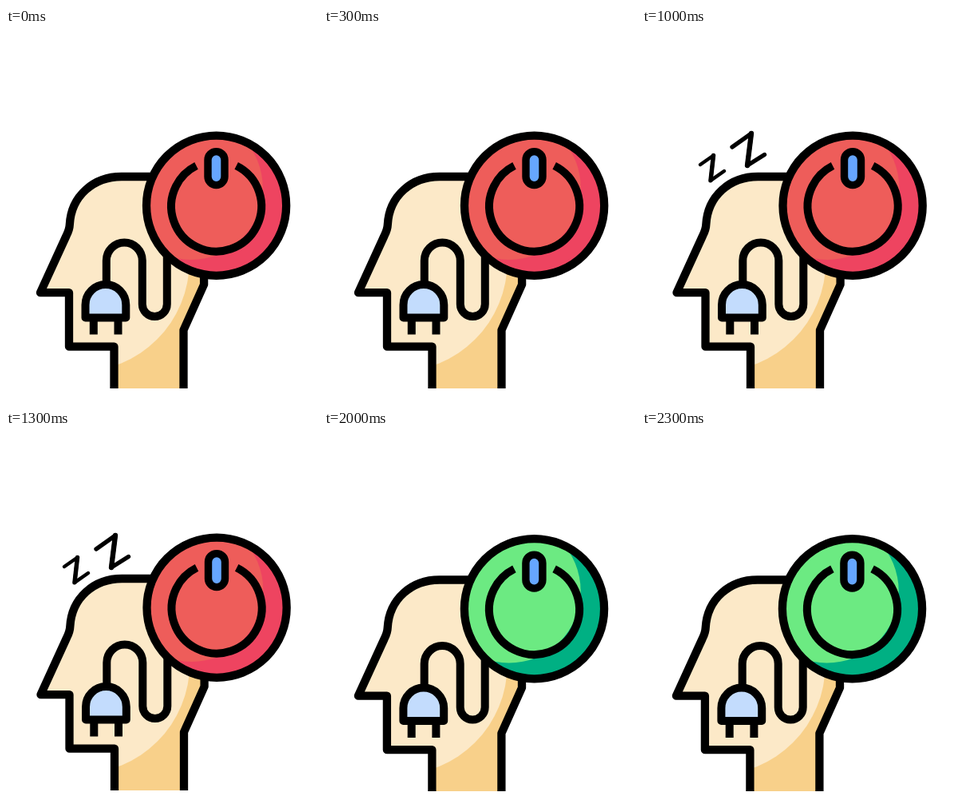
Animation, 391 px wide and 468 px high, one loop 2500 ms. Source, as an HTML page with a canvas:

```html
<!DOCTYPE html>
<html lang="en">
<head>
<meta charset="utf-8">
<title>Power nap</title>
<style>
  html, body { margin: 0; width: 100%; height: 100%; overflow: hidden; background: #fff; }
  canvas { display: block; }
</style>
</head>
<body>
<canvas id="stage" width="391" height="468"></canvas>
<script>
const ctx = document.getElementById('stage').getContext('2d');
const STEP = 500;

const RED = { base: '#ee5d5a', shade: '#ee4460' };
const GREEN = { base: '#6cea82', shade: '#00b083' };

// Each pose: small drift of the drawing, number of Zs, button colours.
const poses = [
  { dx: -0.2, dy: 0, zs: 0, button: RED },
  { dx: 0.3, dy: 0, zs: 1, button: RED },
  { dx: 0.3, dy: 0, zs: 2, button: RED },
  { dx: -0.3, dy: 0.7, zs: 3, button: RED },
  { dx: -0.3, dy: 1.5, zs: 0, button: GREEN }
];

const head = new Path2D(
  'M135.7 460 V398.7 H79.2 V331.2 H43.2 L75.8 260 Q79.8 252 80 246 ' +
  'C82 210 110 186 145 186 H200 L248.3 300 V321 L222.7 378 V460');
const cord = new Path2D(
  'M126 322 V291 A22.5 22.5 0 0 1 171 291 V345.5 A15.5 15.5 0 0 0 202 345.5 V285');
const plug = new Path2D('M99.7 362.5 V346.5 A25.4 25.4 0 0 1 150.5 346.5 V362.5 Z');
const prongs = new Path2D('M110 362 V383.5 M140.7 362 V383.5');

// Zs as corner points, with a slightly heavier diagonal.
const zShapes = [
  { points: [[73, 171], [89.5, 159.5], [86, 190.8], [103, 179]], width: 4.5 },
  { points: [[113, 149], [137, 132], [132, 172], [153.5, 158.5]], width: 5.3 },
  { points: [[154, 118.5], [185, 99.5], [178, 149.5], [206.5, 133]], width: 6.2 }
];

function circle(x, y, r) {
  const path = new Path2D();
  path.arc(x, y, r, 0, Math.PI * 2);
  return path;
}

function polyline(points) {
  return new Path2D('M' + points.join(' L'));
}

function fill(path, color) {
  ctx.fillStyle = color;
  ctx.fill(path);
}

function outline(path, width = 10) {
  ctx.lineWidth = width;
  ctx.stroke(path);
}

// Fills a shape with its shade, then covers the lit part with the base colour.
function shaded(path, shade, base, light) {
  ctx.save();
  ctx.clip(path);
  fill(path, shade);
  fill(light, base);
  ctx.restore();
}

function drawHead() {
  shaded(head, '#f8d08a', '#fce9c8', circle(92, 292, 138));
  outline(head, 10.3);
  outline(cord);
  fill(plug, '#c3dcfd');
  outline(plug);
  outline(prongs);
}

function drawButton({ base, shade }) {
  const disc = circle(263.8, 222.2, 87.6);
  shaded(disc, shade, base, circle(232, 200, 90));
  outline(disc, 10.3);

  const ring = new Path2D();
  const gap = 0.46;
  ring.arc(263.8, 223, 56.5, -Math.PI / 2 + gap, Math.PI * 1.5 - gap);
  outline(ring);

  const bar = new Path2D();
  bar.roundRect(253.2, 154.6, 21, 42, 10.5);
  fill(bar, '#66a6ff');
  outline(bar, 9.4);
}

function drawZ({ points, width }) {
  outline(polyline(points), width);
  outline(polyline(points.slice(1, 3)), width + 1);
}

function draw(now) {
  const pose = poses[Math.floor(now / STEP) % poses.length];
  ctx.fillStyle = '#fff';
  ctx.fillRect(0, 0, 391, 468);
  ctx.strokeStyle = '#000';
  ctx.lineJoin = 'round';

  ctx.save();
  ctx.beginPath();
  ctx.rect(0, 0, 391, Math.floor(451 + pose.dy));
  ctx.clip();
  ctx.translate(pose.dx, pose.dy);
  drawHead();
  drawButton(pose.button);
  ctx.restore();

  ctx.save();
  ctx.lineCap = 'round';
  zShapes.slice(0, pose.zs).forEach(drawZ);
  ctx.restore();
}

const start = performance.now();
function tick() {
  draw(performance.now() - start);
  requestAnimationFrame(tick);
}
tick();
</script>
</body>
</html>
```
